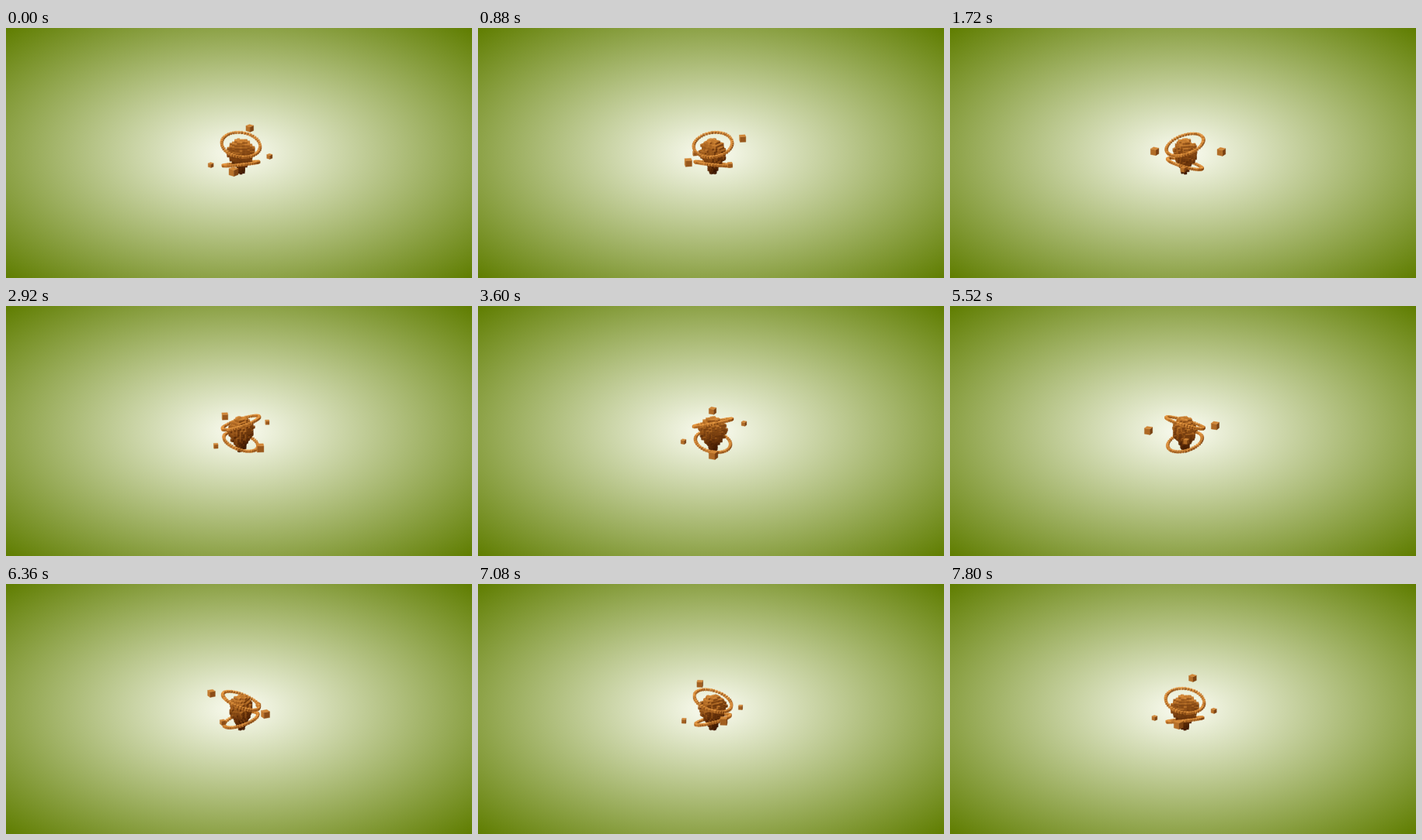
Recreate the animation shown at these times as an HTML page with a canvas. Size 600 by 323 pixels, loop 7.84 s.

```html
<!DOCTYPE html>
<html lang="en">
<head>
<meta charset="utf-8">
<title>Voxel orbit</title>
<style>
  html, body { margin: 0; width: 100%; height: 100%; overflow: hidden; }
  body { background: radial-gradient(ellipse farthest-corner at 50% 50%, #fbfcf2, #5f7d00); }
  canvas { display: block; width: 600px; height: 323px; }
</style>
</head>
<body>
<canvas id="stage" width="600" height="323"></canvas>
<script>
const ctx = document.getElementById('stage').getContext('2d');
const LOOP = 7840, STEP = 40;
const CX = 302.5, CY = 161;
const RAD = Math.PI / 180;
const PITCH = 20.5 * RAD, SIN = Math.sin(PITCH), COS = Math.cos(PITCH);

// Repeatable noise in 0..1
function noise(x, y, z) {
  const n = Math.sin(x * 12.9898 + y * 78.233 + z * 37.719) * 43758.5453;
  return n - Math.floor(n);
}

// Smooth curve through points at uneven times
function curve(times, values, t) {
  const last = times.length - 1;
  if (t >= times[last]) return values[last];
  let i = 0;
  while (t >= times[i + 1]) i++;
  const slope = k => {
    const a = Math.max(k - 1, 0), b = Math.min(k + 1, last);
    return (values[b] - values[a]) / (times[b] - times[a]);
  };
  const span = times[i + 1] - times[i], u = (t - times[i]) / span;
  const u2 = u * u, u3 = u2 * u;
  return (2 * u3 - 3 * u2 + 1) * values[i] + (3 * u2 - 2 * u3) * values[i + 1]
    + span * ((u3 - 2 * u2 + u) * slope(i) + (u3 - u2) * slope(i + 1));
}

// Body: a tapering lump of voxels, only its shell is kept
function makeBody() {
  const size = 3.2;
  const radii = [8, 11.5, 14.5, 15.5, 16, 16, 15.5, 14.5, 12.5, 10.5, 8, 5.5, 5, 4];
  const filled = (i, j, k) => {
    const r = radii[j];
    if (!r) return false;
    const rough = 0.9 + 0.25 * noise(i, j, k);
    return Math.hypot(i * size / r, k * size / (r * 0.8)) < rough;
  };
  const cubes = [];
  for (let j = 0; j < radii.length; j++)
    for (let i = -6; i <= 6; i++)
      for (let k = -6; k <= 6; k++) {
        if (!filled(i, j, k)) continue;
        const buried = filled(i - 1, j, k) && filled(i + 1, j, k) && filled(i, j - 1, k)
          && filled(i, j + 1, k) && filled(i, j, k - 1) && filled(i, j, k + 1);
        if (buried) continue;
        const tone = 0.98 - j * 0.042 + (noise(k, i, j) - 0.5) * 0.14;
        cubes.push({ x: i * size, y: 15 - j * size, b: k * size, size, tone, yaw: 0 });
      }
  return cubes;
}

// Ring of beads whose axis leans by tilt towards the heading
function makeRing(radius, y, heading, tilt, count) {
  const ex = Math.cos(heading * RAD), eb = Math.sin(heading * RAD);
  const ct = Math.cos(tilt * RAD), st = Math.sin(tilt * RAD);
  return Array.from({ length: count }, (_, n) => {
    const a = n / count * 2 * Math.PI;
    const p = radius * Math.cos(a), q = radius * Math.sin(a);
    return {
      x: -eb * p + ex * ct * q,
      y: y - st * q,
      b: ex * p + eb * ct * q,
      size: 2.8, tone: 0.98 + 0.16 * noise(n, y, 1), yaw: a
    };
  });
}

const solid = [
  ...makeBody(),
  ...makeRing(25, 10.8, -70, 20, 42),
  ...makeRing(23, -15.4, 110, 18, 40)
];

const keys = [0, 1720, 2920, 3600, 4680, 6360, 7800];
const orbiters = [
  { angle: 76, radius: 47, size: 7.8, lift: [15.6, 2, -8.5, -15, -8, 10, 23.4] },
  { angle: -14, radius: 38, size: 5, lift: [-1.7, -8.3, -12.7, -14, -11.3, -6, 0] },
  { angle: -104, radius: 39, size: 7.8, lift: [-11.4, 1, 7, 12, 10, 1, -7.4] },
  { angle: 166, radius: 40, size: 5, lift: [-19.5, -6, 3.4, 9, 6, -6.3, -15] }
];

function orbiterAt(o, t) {
  const a = o.angle * RAD;
  return {
    x: o.radius * Math.cos(a), y: curve(keys, o.lift, t) / COS, b: o.radius * Math.sin(a),
    size: o.size, tone: 0.98, yaw: 49 * RAD
  };
}

function color(k) {
  const r = 206 * k, g = 132 * Math.pow(k, 1.35), b = 54 * Math.pow(k, 2.1);
  return `rgb(${Math.min(r, 255) | 0},${g | 0},${b | 0})`;
}

function quad(points, shade) {
  ctx.beginPath();
  for (const [x, y, b] of points) ctx.lineTo(CX + x, CY - y * COS - b * SIN);
  ctx.closePath();
  ctx.fillStyle = ctx.strokeStyle = color(shade);
  ctx.fill();
  ctx.stroke();
}

function drawCube(c, turn) {
  const size = c.size * (1 - c.b / 420), half = size / 2, reach = size * Math.SQRT1_2;
  const yaw = c.yaw + turn;
  const corner = (a, y) => [c.x + reach * Math.cos(a), c.y + y, c.b + reach * Math.sin(a)];
  for (let n = 0; n < 4; n++) {
    const a = yaw + n * Math.PI / 2;
    if (Math.sin(a) >= 0) continue;
    const l = a - Math.PI / 4, r = a + Math.PI / 4;
    quad([corner(l, half), corner(r, half), corner(r, -half), corner(l, -half)],
      c.tone * (0.78 - 0.2 * Math.cos(a)));
  }
  quad([1, 3, 5, 7].map(n => corner(yaw + n * Math.PI / 4, half)), c.tone * 1.04);
}

function draw(t) {
  const turn = -2 * Math.PI * t / LOOP;
  const c = Math.cos(turn), s = Math.sin(turn);
  const cubes = [...solid, ...orbiters.map(o => orbiterAt(o, t))].map(p => ({
    ...p, x: p.x * c - p.b * s, b: p.x * s + p.b * c
  }));
  const near = p => p.y * SIN - p.b * COS;
  cubes.sort((p, q) => near(p) - near(q));
  ctx.clearRect(0, 0, 600, 323);
  ctx.lineWidth = 0.35;
  ctx.lineJoin = 'round';
  for (const p of cubes) drawCube(p, turn);
}

const start = performance.now();
let shown = -1;
function tick() {
  const t = Math.floor((performance.now() - start) % LOOP / STEP) * STEP;
  if (t !== shown) draw(shown = t);
  requestAnimationFrame(tick);
}
tick();
</script>
</body>
</html>
```
